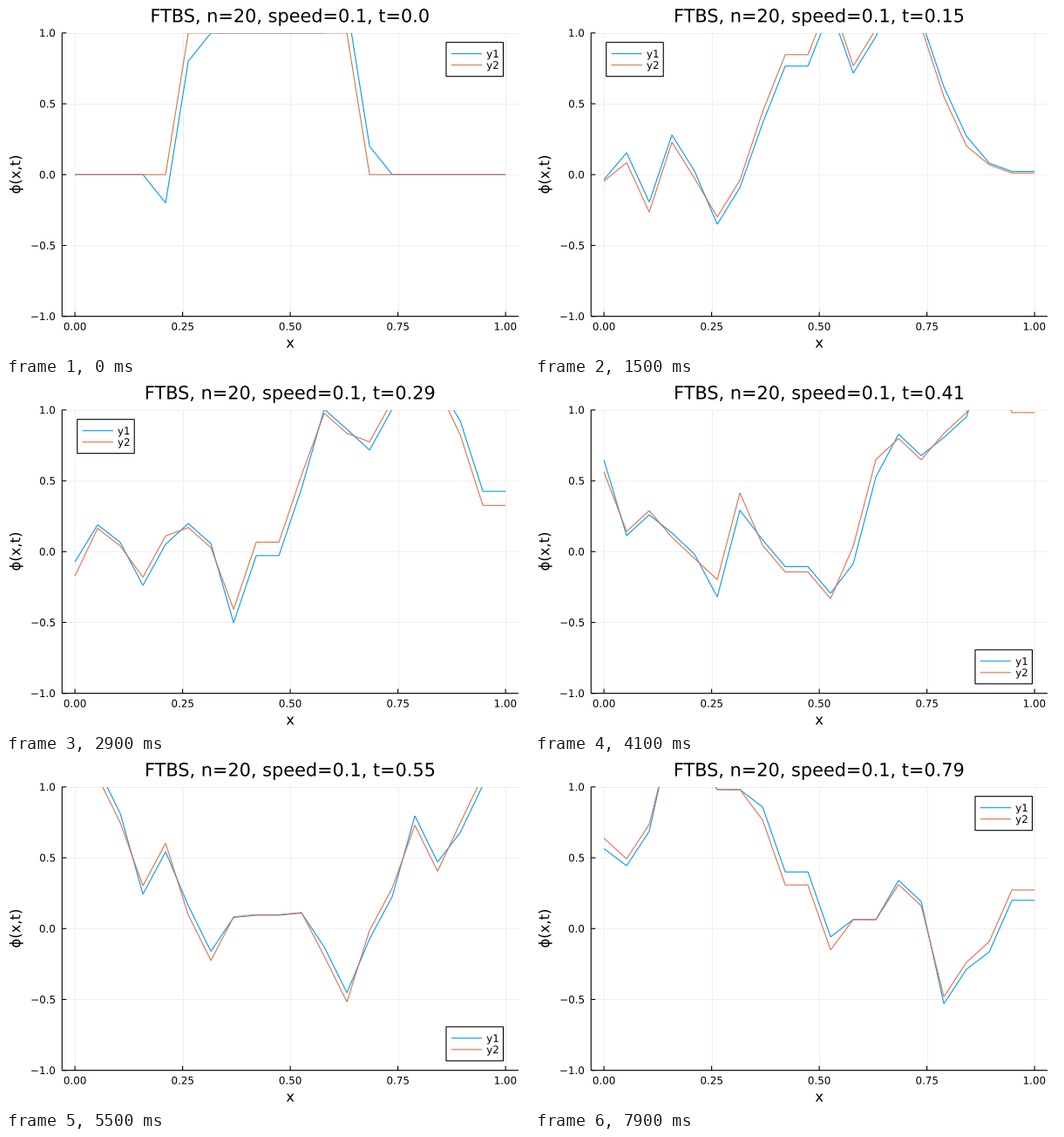
Animation, 600 px wide and 400 px high, one loop 8 s. Source, as a matplotlib script:

```python
import matplotlib.pyplot as plt
import numpy as np
from matplotlib.animation import FuncAnimation
from matplotlib.lines import Line2D
from matplotlib.patches import PathPatch, Rectangle
from matplotlib.path import Path
from matplotlib.textpath import TextPath
from matplotlib.transforms import Affine2D

plt.rcParams["font.family"] = "DejaVu Sans"

WIDTH, HEIGHT, DPI = 600, 400, 100
FRAMES, INTERVAL = 80, 100
N, COURANT = 20, 0.2
BLUE, ORANGE = "#009afa", "#e36f47"
PX = 72 / DPI  # points per pixel

# Data to pixel mapping
X_ZERO, X_UNIT = 79.1, 494.0
Y_ZERO, Y_UNIT = 193.25, 162.4
X_LIM, Y_LIM = (-0.03, 1.03), (-1.0, 1.0)


def px(x):
    return X_ZERO + X_UNIT * x


def py(y):
    return Y_ZERO - Y_UNIT * y


LEFT, RIGHT = px(X_LIM[0]), px(X_LIM[1])
TOP, BOTTOM = py(Y_LIM[1]), py(Y_LIM[0])
MID = (LEFT + RIGHT) / 2
TITLE_SIZE, LABEL_SIZE, SMALL_SIZE = 20.83, 16.37, 11.9
LEGEND_W, LEGEND_H = 65.5, 39.0


def solve():
    """Leapfrog advection of a box on a periodic grid."""
    j = np.arange(N)
    now = ((j >= 5) & (j <= 12)).astype(float)
    states, before = [now], now
    for _ in range(FRAMES):
        slope = np.roll(now, -1) - np.roll(now, 1)
        before, now = now, before - COURANT * slope
        states.append(now)
    return states


def legend_corner(series):
    """Pick the corner (right, top) least crowded by data points."""
    u = (grid_x - X_LIM[0]) / (X_LIM[1] - X_LIM[0])
    corners = [(1, 1), (0, 1), (1, 0), (0, 0)]
    crowd = []
    for cx, cy in corners:
        total = 0.0
        for y in series:
            v = (y - Y_LIM[0]) / (Y_LIM[1] - Y_LIM[0])
            dx, dy = np.abs(u - cx), np.abs(v - cy)
            near = (dx <= 0.25) & (dy <= 0.25) & (v >= 0) & (v <= 1)
            total += np.sum(1 / (1 + 100 * np.hypot(dx, dy)[near]))
        crowd.append(total)
    return corners[int(np.argmin(crowd))]


def text_path(s, x, y, size, align="center", turned=False):
    """Outline of s with its baseline at pixel (x, y)."""
    path = TextPath((0, 0), s, size=size)
    v = np.array(path.vertices)
    box = path.get_extents()
    v[:, 0] -= {"left": 0, "center": (box.x0 + box.x1) / 2, "right": box.x1}[align]
    if turned:
        v = np.column_stack([x - v[:, 1], y - v[:, 0]])
    else:
        v = np.column_stack([x + v[:, 0], y - v[:, 1]])
    return Path(v, path.codes)


def add_text(*args, transform=None, z=5, **kw):
    patch = PathPatch(text_path(*args, **kw), fc="black", lw=0, zorder=z,
                      transform=transform or ax.transData)
    return ax.add_patch(patch)


def add_line(xs, ys, color="black", width=1.1, z=2, snap=False, transform=None):
    line = Line2D(xs, ys, color=color, lw=width * PX, zorder=z, snap=snap,
                  solid_capstyle="butt", solid_joinstyle="miter",
                  transform=transform or ax.transData)
    return ax.add_line(line)


fig = plt.figure(figsize=(WIDTH / DPI, HEIGHT / DPI), dpi=DPI, facecolor="white")
ax = fig.add_axes([0, 0, 1, 1])
ax.set_xlim(0, WIDTH)
ax.set_ylim(HEIGHT, 0)
ax.axis("off")

# Grid, ticks and axes
for x in np.linspace(0, 1, 5):
    add_line([px(x)] * 2, [TOP, BOTTOM], "#efefef", 1, 1, True)
    add_line([px(x)] * 2, [BOTTOM, BOTTOM - 5])
    add_text(f"{x:.2f}", px(x), 371.5, SMALL_SIZE)
for y in np.linspace(-1, 1, 5):
    add_line([LEFT, RIGHT], [py(y)] * 2, "#efefef", 1, 1, True)
    add_line([LEFT, LEFT + 5], [py(y)] * 2)
    label = f"{y:.1f}".replace("-", "\u2212")
    add_text(label, 56.1, py(y) + 4.35, SMALL_SIZE, align="right")
add_line([LEFT, LEFT], [TOP, BOTTOM])
add_line([LEFT, RIGHT], [BOTTOM, BOTTOM])
add_text("x", MID, 391.5, LABEL_SIZE)
add_text("\u03d5(x,t)", 16.3, Y_ZERO, LABEL_SIZE, turned=True)
title = add_text("FTBS", MID, 18.5, TITLE_SIZE)

# Curves
grid_x = np.linspace(0, 1, N)
states = solve()
area = Rectangle((LEFT, TOP), RIGHT - LEFT, BOTTOM - TOP, transform=ax.transData)
curves = [add_line(px(grid_x), py(states[0]), c, z=3) for c in (BLUE, ORANGE)]
for curve in curves:
    curve.set_clip_path(area)

# Legend, moved as one piece
shift = Affine2D()
moved = shift + ax.transData
ax.add_patch(Rectangle((0, 0), LEGEND_W, LEGEND_H, fc="white", ec="black",
                       lw=1.1 * PX, zorder=6, transform=moved, snap=False))
for i, color in enumerate((BLUE, ORANGE)):
    y = 13 * (i + 1)
    add_line([5.8, 41.2], [y, y], color, z=7, transform=moved)
    add_text(f"y{i + 1}", 46.2, y + 4.35, SMALL_SIZE, align="left",
             transform=moved, z=7)


def update(k):
    series = states[k + 1], states[k]
    for curve, y in zip(curves, series):
        curve.set_ydata(py(y))
    s = f"FTBS, n=20, speed=0.1, t={round(k / 100, 2)}"
    title.set_path(text_path(s, MID, 18.5, TITLE_SIZE))
    right, top = legend_corner(series)
    gap_x, gap_y = (RIGHT - LEFT) / 30, (BOTTOM - TOP) / 30
    x = RIGHT - gap_x - LEGEND_W if right else LEFT + gap_x
    y = TOP + gap_y if top else BOTTOM - gap_y - LEGEND_H
    shift.clear().translate(x, y)
    return [*curves, title]


anim = FuncAnimation(fig, update, frames=FRAMES, interval=INTERVAL,
                     repeat=True, repeat_delay=0, blit=False)
plt.show()
```
